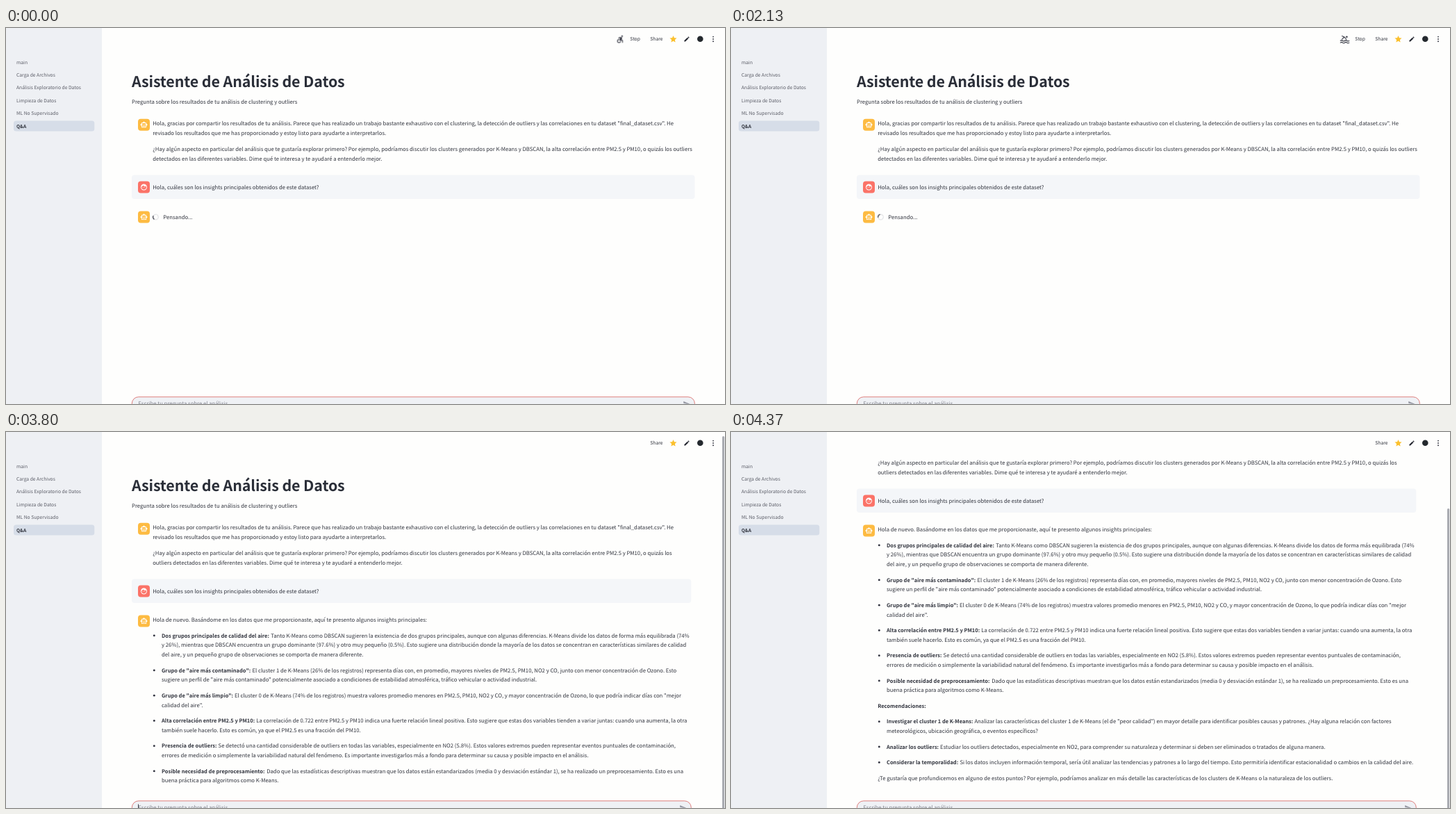
Write an HTML page that moves like this. It is 1035x541 px and loops after 4.4 s.

```html
<!DOCTYPE html>
<html lang="es">
<head>
<meta charset="utf-8">
<title>Asistente de Análisis de Datos</title>
<style>
html, body { margin: 0; width: 100%; height: 100%; overflow: hidden; background: #fefefd; }
svg { display: block; width: 1035px; height: 541px; }
text {
  font: 7.73px "Noto Sans CJK JP", "Noto Sans CJK SC", "Noto Sans CJK", "Noto Sans", sans-serif;
  fill: #30333d; text-rendering: geometricPrecision; white-space: pre;
}
.bold { font-size: 7.49px; font-weight: 700; }
.title { font-size: 21.42px; font-weight: 700; letter-spacing: -.118px; fill: #2a2e38; }
.small { font-size: 6.75px; }
.nav { font-size: 6.75px; fill: #5b5d67; }
.navOn { font-size: 6.6px; font-weight: 700; }
.hint { fill: #868892; }
.line { fill: none; stroke: #31333f; stroke-width: 2; stroke-linecap: round; stroke-linejoin: round; }
</style>
</head>
<body>
<svg id="stage" viewBox="0 0 1035 541">
  <defs>
    <g id="robot">
      <rect width="17" height="17" rx="4" fill="#fdbb42"/>
      <g transform="translate(3.1 3.1) scale(.45)" fill="#fff">
        <path fill-rule="evenodd" d="M20 9V7c0-1.1-.9-2-2-2h-3c0-1.66-1.34-3-3-3S9 3.34 9 5H6c-1.1 0-2 .9-2 2v2c-1.66 0-3 1.34-3 3s1.34 3 3 3v4c0 1.1.9 2 2 2h12c1.1 0 2-.9 2-2v-4c1.66 0 3-1.34 3-3s-1.34-3-3-3zM18 19H6V7h12z"/>
        <circle cx="9" cy="11.5" r="1.5"/><circle cx="15" cy="11.5" r="1.5"/><path d="M8 15h8v2H8z"/>
      </g>
    </g>
    <g id="person">
      <rect width="17" height="17" rx="4" fill="#fb7368"/>
      <g transform="translate(3.1 3.1) scale(.45)" fill="#fff">
        <path fill-rule="evenodd" d="M12 2C6.48 2 2 6.48 2 12s4.48 10 10 10 10-4.48 10-10S17.52 2 12 2zm0 18c-4.41 0-8-3.59-8-8 0-.29.02-.58.05-.86 2.36-1.05 4.23-2.98 5.21-5.37C11.07 8.33 14.05 10 17.42 10c.78 0 1.53-.09 2.25-.26.21.71.33 1.47.33 2.26 0 4.41-3.59 8-8 8z"/>
        <circle cx="9" cy="13" r="1.25"/><circle cx="15" cy="13" r="1.25"/>
      </g>
    </g>
    <path id="send" d="M2 21l21-9L2 3v7l15 2-15 2z" fill="#9698a3"/>
  </defs>
  <g id="waiting"></g>
  <g id="answered"><g id="scroll"></g></g>
  <path d="M138 0H1030V32H138zM138 517H1030V541H138z" fill="#fefefd"/>
  <g id="inputs"></g>
  <path id="cursor" d="M190.5 535.5V541" stroke="#31333f" stroke-width=".9"/>
  <g id="bar"><rect id="thumb" x="1031" y="6" width="3.2" height="560" rx="1.5" fill="#a9abb1"/></g>
  <g id="side"></g>
  <g id="tools">
    <path d="M960.5 10.9l1.45 3.25 3.55.4-2.65 2.4.75 3.5-3.1-1.8-3.1 1.8.75-3.5-2.65-2.4 3.55-.4z" fill="#fbc02d"/>
    <path transform="translate(975.2 11.2) scale(.4)" fill="#24262f" d="M3 17.25V21h3.75L17.81 9.94l-3.75-3.75zM20.71 7.04a1 1 0 0 0 0-1.41l-2.34-2.34a1 1 0 0 0-1.41 0l-1.83 1.83 3.75 3.75z"/>
    <circle cx="999.3" cy="15.8" r="4.3" fill="#24292e"/>
    <g fill="#31333f"><circle cx="1018" cy="12.6" r=".95"/><circle cx="1018" cy="15.9" r=".95"/><circle cx="1018" cy="19.2" r=".95"/></g>
  </g>
  <g id="busy">
    <g id="sports" transform="translate(876.8 9.3) scale(.56)">
      <g>
        <circle cx="18" cy="4.5" r="2" fill="#31333f"/>
        <path fill="#31333f" d="M15 17h-2c0 1.65-1.35 3-3 3s-3-1.35-3-3 1.35-3 3-3v-2c-2.76 0-5 2.24-5 5s2.24 5 5 5 5-2.24 5-5zm3-3.5h-1.86l1.67-3.67C18.42 8.5 17.44 7 15.96 7h-5.2c-.81 0-1.54.47-1.87 1.2L8.22 10l1.92.53.65-1.53H13l-1.83 4.1c-.6 1.33.39 2.9 1.85 2.9H18v5h2v-5.5c0-1.1-.9-2-2-2z"/>
      </g>
      <g>
        <circle cx="13.5" cy="3.5" r="2" fill="#31333f"/>
        <path class="line" d="M5 11V7.5L10.5 6L13 8.5L18.5 11M10.5 6L9.5 13L13.5 16V22M9.5 13L8 19L3.5 18"/>
      </g>
      <g>
        <circle cx="15.5" cy="3.5" r="2" fill="#31333f"/>
        <g class="line"><circle cx="5" cy="17" r="4"/><circle cx="19" cy="17" r="4"/><path d="M12 19V14L8.5 11L12 7L15 10H19"/></g>
      </g>
      <g>
        <circle cx="15" cy="5" r="2" fill="#31333f"/>
        <path class="line" d="M4 20L12 12L8 10L14 9L16 15L21 20M6 15L13 17"/>
      </g>
      <g>
        <circle cx="17" cy="6" r="2.2" fill="#31333f"/>
        <path class="line" stroke-width="1.6" d="M5 4L10 6L16 12M10 7L5 12M1 16q2.75-2.5 5.5 0t5.5 0t5.5 0t5.5 0M1 21q2.75-2.5 5.5 0t5.5 0t5.5 0t5.5 0"/>
      </g>
    </g>
  </g>
</svg>
<script>
const LOOP = 4400, REPLY = 3800;
const $ = id => document.getElementById(id);

function add(parent, tag, attrs, content) {
  const el = document.createElementNS('http://www.w3.org/2000/svg', tag);
  for (const key in attrs) el.setAttribute(key, attrs[key]);
  if (content) el.textContent = content;
  parent.append(el);
  return el;
}
const write = (parent, x, y, content, cls = '') => add(parent, 'text', { x, y, class: cls }, content);
const use = (parent, name, y) => add(parent, 'use', { href: '#' + name, x: 190, y: y - 8.5 });

// Conversation: everything above the reply
function opening(parent, right, second) {
  write(parent, 181, 85, 'Asistente de Análisis de Datos', 'title');
  write(parent, 181, 109.4, 'Pregunta sobre los resultados de tu análisis de clustering y outliers');
  use(parent, 'robot', 139.2);
  [
    [140.4, 'Hola, gracias por compartir los resultados de tu análisis. Parece que has realizado un trabajo bastante exhaustivo con el clustering, la detección de outliers y las correlaciones en tu dataset "final_dataset.csv". He'],
    [154.2, 'revisado los resultados que me has proporcionado y estoy listo para ayudarte a interpretarlos.'],
    [176.9, second[0]],
    [190.6, second[1]]
  ].forEach(([y, line]) => write(parent, 211.2, y, line));
  add(parent, 'rect', { x: 181, y: 211.5, width: right - 181, height: 34.5, rx: 4, fill: '#f4f6f9' });
  use(parent, 'person', 229);
  write(parent, 211.2, 231.9, 'Hola, cuáles son los insights principales obtenidos de este dataset?');
  use(parent, 'robot', 272);
}
const ask = '¿Hay algún aspecto en particular del análisis que te gustaría explorar primero? Por ejemplo, podríamos discutir los clusters generados por K-Means y DBSCAN, la alta correlación entre PM2.5 y PM10, o quizás los';
const tail = 'detectados en las diferentes variables. Dime qué te interesa y te ayudaré a entenderlo mejor.';
opening($('waiting'), 991.5, [ask + ' outliers', tail]);
opening($('scroll'), 986.3, [ask, 'outliers ' + tail]);

// Spinner
write($('waiting'), 226.3, 275, 'Pensando...');
const ring = { r: 3.8, fill: 'none', 'stroke-width': 1.1 };
const spinner = add(add($('waiting'), 'g', { transform: 'translate(215.5 272)' }), 'g', {});
add(spinner, 'circle', { ...ring, stroke: '#dcdde0' });
add(spinner, 'path', { ...ring, d: 'M-2.7 -2.7A3.8 3.8 0 0 1 2.7 -2.7', stroke: '#31333f' });

// Reply: [heading, x where the body starts, ...lines]
const points = [
  ['Dos grupos principales de calidad del aire:', 381.2,
    'Tanto K-Means como DBSCAN sugieren la existencia de dos grupos principales, aunque con algunas diferencias. K-Means divide los datos de forma más equilibrada (74%',
    'y 26%), mientras que DBSCAN encuentra un grupo dominante (97.6%) y otro muy pequeño (0.5%). Esto sugiere una distribución donde la mayoría de los datos se concentran en características similares de calidad',
    'del aire, y un pequeño grupo de observaciones se comporta de manera diferente.'],
  ['Grupo de "aire más contaminado":', 354.5,
    'El cluster 1 de K-Means (26% de los registros) representa días con, en promedio, mayores niveles de PM2.5, PM10, NO2 y CO, junto con menor concentración de Ozono. Esto',
    'sugiere un perfil de "aire más contaminado" potencialmente asociado a condiciones de estabilidad atmosférica, tráfico vehicular o actividad industrial.'],
  ['Grupo de "aire más limpio":', 329,
    'El cluster 0 de K-Means (74% de los registros) muestra valores promedio menores en PM2.5, PM10, NO2 y CO, y mayor concentración de Ozono, lo que podría indicar días con "mejor',
    'calidad del aire".'],
  ['Alta correlación entre PM2.5 y PM10:', 360.2,
    'La correlación de 0.722 entre PM2.5 y PM10 indica una fuerte relación lineal positiva. Esto sugiere que estas dos variables tienden a variar juntas: cuando una aumenta, la otra',
    'también suele hacerlo. Esto es común, ya que el PM2.5 es una fracción del PM10.'],
  ['Presencia de outliers:', 305.6,
    'Se detectó una cantidad considerable de outliers en todas las variables, especialmente en NO2 (5.8%). Estos valores extremos pueden representar eventos puntuales de contaminación,',
    'errores de medición o simplemente la variabilidad natural del fenómeno. Es importante investigarlos más a fondo para determinar su causa y posible impacto en el análisis.'],
  ['Posible necesidad de preprocesamiento:', 375.2,
    'Dado que las estadísticas descriptivas muestran que los datos están estandarizados (media 0 y desviación estándar 1), se ha realizado un preprocesamiento. Esto es una',
    'buena práctica para algoritmos como K-Means.'],
  ['Recomendaciones:'],
  ['Investigar el cluster 1 de K-Means:', 350.4,
    'Analizar las características del cluster 1 de K-Means (el de "peor calidad") en mayor detalle para identificar posibles causas y patrones. ¿Hay alguna relación con factores',
    'meteorológicos, ubicación geográfica, o eventos específicos?'],
  ['Analizar los outliers:', 301.1,
    'Estudiar los outliers detectados, especialmente en NO2, para comprender su naturaleza y determinar si deben ser eliminados o tratados de alguna manera.'],
  ['Considerar la temporalidad:', 329.4,
    'Si los datos incluyen información temporal, sería útil analizar las tendencias y patrones a lo largo del tiempo. Esto permitiría identificar estacionalidad o cambios en la calidad del aire.']
];
const page = $('scroll');
write(page, 211.2, 273.4, 'Hola de nuevo. Basándome en los datos que me proporcionaste, aquí te presento algunos insights principales:');
let y = 295.5;
for (const [heading, bodyX, ...lines] of points) {
  write(page, lines.length ? 224 : 211.2, y, heading, 'bold');
  if (lines.length) add(page, 'circle', { cx: 213.3, cy: y - 2.6, r: 1.45, fill: '#31333f' });
  lines.forEach((line, i) => write(page, i ? 224 : bodyX, y + i * 13.75, line));
  y += Math.max(lines.length - 1, 0) * 13.75 + 22.5;
}
write(page, 211.2, y, '¿Te gustaría que profundicemos en alguno de estos puntos? Por ejemplo, podríamos analizar en más detalle las características de los clusters de K-Means o la naturaleza de los outliers.');

// Chat input, wide while waiting and narrower beside the scrollbar
const [wideInput, slimInput] = [991.4, 986.3].map(right => {
  const g = add($('inputs'), 'g', {});
  add(g, 'rect', { x: 181.3, y: 530.8, width: right - 181.3, height: 21, rx: 9.5, fill: '#eff1f5', stroke: '#d9605c', 'stroke-width': .8 });
  add(g, 'use', { href: '#send', transform: `translate(${right - 17} 535.6) scale(.44)` });
  write(g, 190.3, 543.2, 'Escribe tu pregunta sobre el análisis...', 'hint');
  return g;
});

// Sidebar and header
add($('side'), 'rect', { width: 138, height: 541, fill: '#eef0f4' });
add($('side'), 'rect', { x: 11, y: 133.6, width: 116.3, height: 15, rx: 3.5, fill: '#d6dde8' });
['main', 'Carga de Archivos', 'Análisis Exploratorio de Datos', 'Limpieza de Datos', 'ML No Supervisado', 'Q&A']
  .forEach((name, i) => write($('side'), 15, 51.6 + i * 18.38, name, i < 5 ? 'nav' : 'navOn'));
write($('tools'), 927.3, 18.4, 'Share', 'small');
write($('busy'), 898.3, 18.4, 'Stop', 'small');

// Motion: tables of [ms, value]
function run(el, prop, table, easing = 'linear') {
  const frames = table.map(([ms, value]) => ({ offset: ms / LOOP, [prop]: value, easing }));
  el.animate(frames, { duration: LOOP, iterations: Infinity });
}
const step = (el, prop, table) => run(el, prop, [...table, [LOOP, table[table.length - 1][1]]], 'steps(1, end)');
const blink = (el, table) => step(el, 'opacity', table);

for (const el of [$('waiting'), $('busy'), wideInput]) blink(el, [[0, 1], [REPLY, 0]]);
for (const el of [$('answered'), $('bar'), slimInput]) blink(el, [[0, 0], [REPLY, 1]]);
blink($('cursor'), Array.from({ length: 9 }, (_, i) => [i * 500, i % 2]));

run(spinner, 'transform', [[0, 'rotate(255deg)'], [LOOP, `rotate(${255 + 360 * LOOP / 1000}deg)`]]);

// The page jumps down as the reply grows; the thumb always reaches the bottom
const travel = [[0, 0], [3835, 60], [3865, 96.6], [3900, 115], [3928, 130]];
step(page, 'transform', travel.map(([ms, d]) => [ms, `translateY(${-d}px)`]));
step($('thumb'), 'transform', travel.map(([ms, d]) => [ms, `translateY(${d * .8}px)`]));

const STEP = 250;
[...$('sports').children].forEach((el, i, all) => {
  const table = [[0, i ? 0 : 1]];
  for (let k = 1; 100 + (k - 1) * STEP < LOOP; k++) table.push([100 + (k - 1) * STEP, k % all.length === i ? 1 : 0]);
  blink(el, table);
});
</script>
</body>
</html>
```
